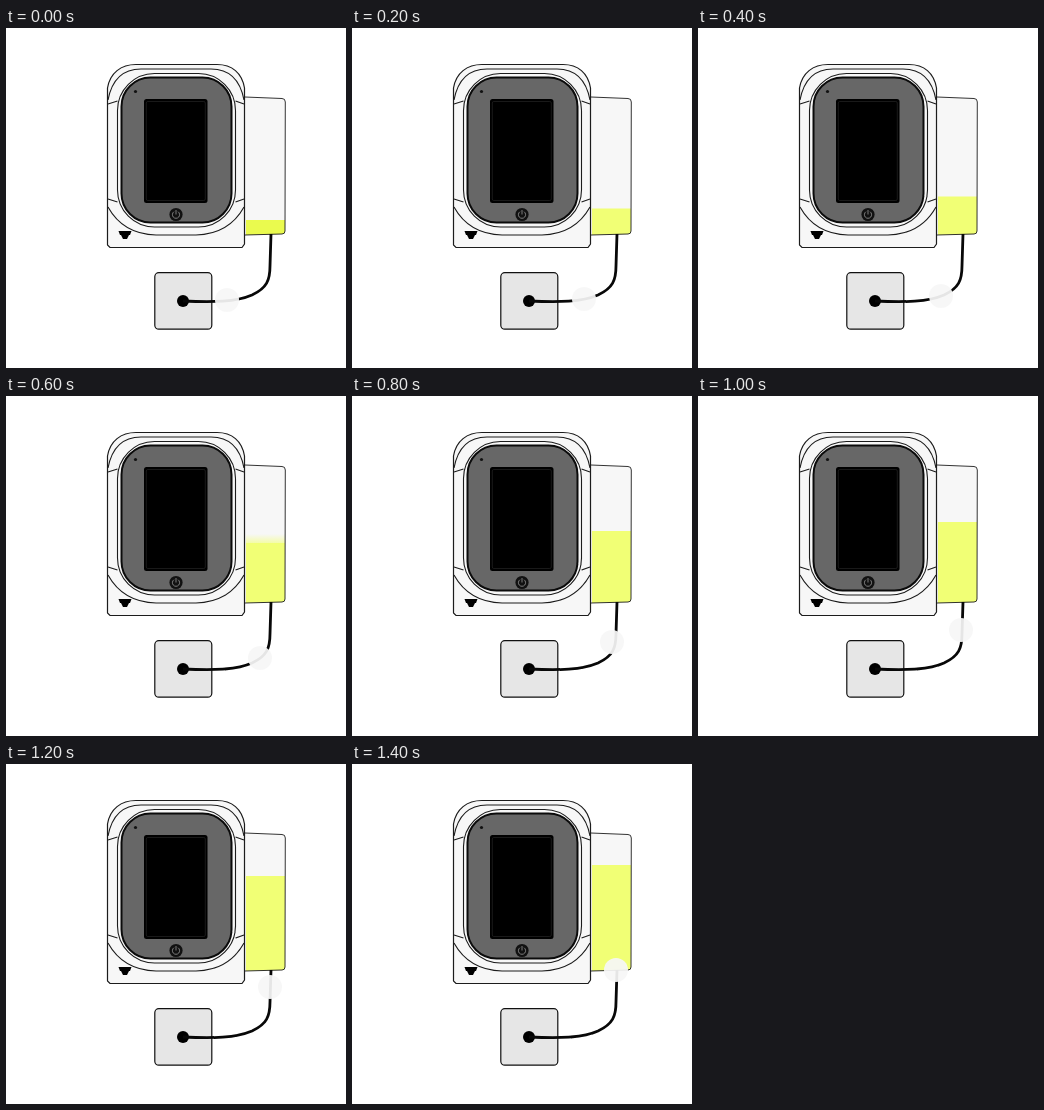
Animation, 340 px wide and 340 px high, one loop 2.4 s. Source, as an HTML page:

```html
<!DOCTYPE html>
<html lang="en">
<head>
<meta charset="utf-8">
<title>Filling canister</title>
<style>
  html, body { margin: 0; width: 100%; height: 100%; overflow: hidden; background: #fff; }
  svg { display: block; width: 100vw; height: 100vh; }
  .line { fill: none; stroke: #1c1c1c; stroke-width: 1.1; }
</style>
</head>
<body>
<svg viewBox="0 0 340 340">
  <defs>
    <linearGradient id="haze" x1="0" y1="0" x2="0" y2="1">
      <stop offset="0" stop-color="#f1ff75" stop-opacity="0"/>
      <stop offset="1" stop-color="#f1ff75" stop-opacity=".6"/>
    </linearGradient>
    <clipPath id="tank">
      <path d="M240 69L276 71Q279 71 279 74V203Q279 206 276 206L240 207Z"/>
    </clipPath>
  </defs>

  <!-- canister -->
  <path d="M239 69L276 71Q279 71 279 74V203Q279 206 276 206L239 207Z" fill="#f7f7f7"/>
  <g clip-path="url(#tank)">
    <rect id="foam" x="240" y="138" width="40" height="9" fill="url(#haze)"/>
    <rect id="fluid" x="240" width="40"/>
  </g>
  <path class="line" d="M239 69L276 70.500Q279.300 70.500 279.300 74L279 203Q279 206 276 206L239 207" style="stroke-width:.9"/>

  <!-- pump body -->
  <path d="M101.500 217V60C104 45 115 36.500 130 36.500H211C226 36.500 236 45 238.500 60V216L236 219.500H104Z"
        fill="#f7f7f7" stroke="#1c1c1c" stroke-width="1.200"/>
  <g class="line">
    <path d="M102 72C106 51 118 41 135 41H205C222 41 234 51 238 72"/>
    <path d="M102 76L111.500 73M238 76L229.500 73M102 171L111.500 174M238 171L229.500 174"/>
    <rect x="111.500" y="45.500" width="118" height="153.500" rx="37"/>
    <path d="M102 179C112 197 128 206.500 150 207H190C212 206.500 228 197 238 179"/>
  </g>
  <rect x="115.500" y="49.500" width="110" height="145" rx="29" fill="#676767" stroke="#0b0b0b" stroke-width="2"/>
  <rect x="138" y="71" width="63.500" height="104" rx="2.500"/>
  <rect x="140.300" y="73.500" width="59" height="99" rx="1.500" fill="#000" stroke="#2a2a2a" stroke-width=".6"/>
  <circle cx="129.500" cy="63.500" r="1.600" fill="#111"/>
  <circle cx="170" cy="186.500" r="6.600" fill="#111"/>
  <path d="M168 183.700A3.600 3.600 0 1 0 172 183.700M170 182V186.500" fill="none" stroke="#888" stroke-width=".9"/>
  <path d="M112.500 203H125.500L124 207H123L121 211H117L115 207H114Z"/>

  <!-- dressing and tube -->
  <rect x="148.800" y="244.700" width="57" height="56.500" rx="4" fill="#e6e6e6" stroke="#111" stroke-width="1.200"/>
  <circle cx="177" cy="273" r="6"/>
  <path d="M177 273C207 274.500 230 274 246 267C261 260 264 252 264 238L265 206" fill="none" stroke="#080808" stroke-width="2.800"/>
  <circle id="bubble" r="12" fill="#f6f6f6" fill-opacity=".93"/>
</svg>
<script>
  const LOOP = 2400, STEP = 200, BOTTOM = 207;
  // fluid top, bubble x, bubble y
  const steps = [
    [192, 221, 272], [180.5, 232, 271], [168.5, 243, 268], [147, 254, 262],
    [135, 260, 246], [126, 263, 234], [112, 264, 223], [101, 264, 206]
  ];
  const find = id => document.getElementById(id);
  const fluid = find("fluid"), foam = find("foam"), bubble = find("bubble");
  const start = performance.now();

  function draw(now) {
    const time = Math.max(0, now - start) % LOOP;
    const i = Math.min(Math.floor(time / STEP), steps.length - 1);
    const [top, x, y] = steps[i];
    fluid.setAttribute("y", top);
    fluid.setAttribute("height", BOTTOM - top);
    fluid.setAttribute("fill", i ? "#f1ff75" : "#eafa4e");
    foam.setAttribute("visibility", i === 3 ? "visible" : "hidden");
    bubble.setAttribute("cx", x);
    bubble.setAttribute("cy", y);
    requestAnimationFrame(draw);
  }
  draw(start);
</script>
</body>
</html>
```
